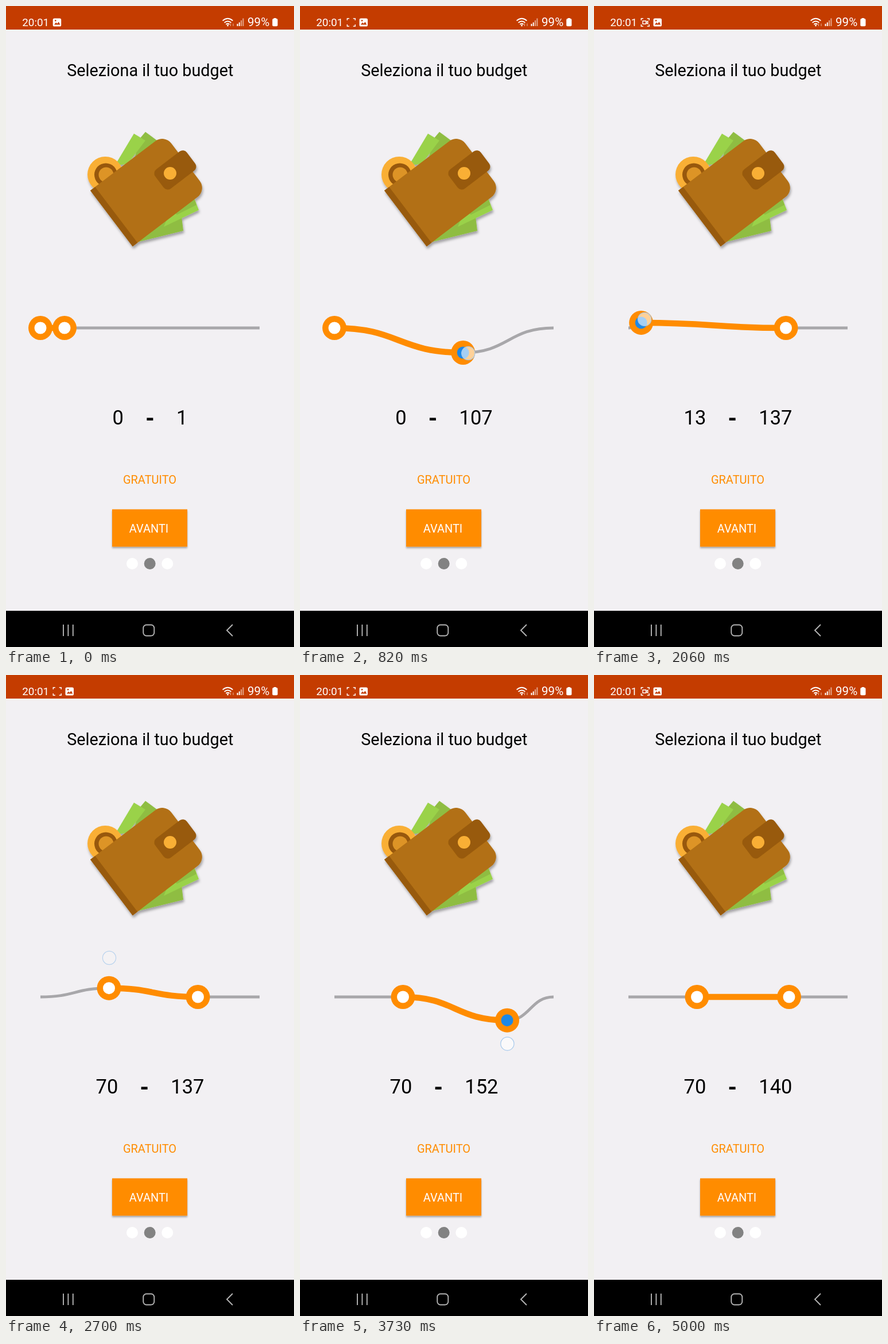
Animation, 502 px wide and 1115 px high, one loop 5510 ms. Source, as an HTML page:

```html
<!DOCTYPE html>
<html lang="it">
<head>
<meta charset="utf-8">
<title>Budget</title>
<style>
  html, body { margin: 0; width: 100%; height: 100%; overflow: hidden; background: #f2f0f3; }
  svg { display: block; width: 100%; height: 100%; font-family: Roboto, sans-serif; }
  .orange { fill: #ff8c00; }
  .line { fill: none; }
  .mid { text-anchor: middle; }
</style>
</head>
<body>
<svg viewBox="0 0 502 1115">
  <defs>
    <filter id="soft" x="-20%" y="-20%" width="140%" height="150%">
      <feDropShadow dx="1.5" dy="4" stdDeviation="2" flood-color="#000" flood-opacity=".33"/>
    </filter>
    <filter id="lift" x="-10%" y="-10%" width="120%" height="130%">
      <feDropShadow dx="0" dy="2.5" stdDeviation="1.6" flood-color="#000" flood-opacity=".32"/>
    </filter>
  </defs>
  <rect width="502" height="1115" fill="#f2f0f3"/>

  <!-- status bar -->
  <rect width="502" height="41" fill="#c43c00"/>
  <g fill="#fff">
    <text x="28.2" y="34.6" font-size="18.9">20:01</text>
    <text x="421" y="34.6" font-size="20.6">99%</text>
    <g id="picture">
      <rect y="21.5" width="14.5" height="14" rx="2.6"/>
      <path d="M2.3 32.6 5.4 28.4 7.5 30.8 10 27.4 12.8 32.6Z" fill="#c43c00"/>
      <circle cx="4.6" cy="25.4" r="1.3" fill="#c43c00"/>
    </g>
    <g id="recorder" fill="none" stroke="#fff" stroke-width="1.4">
      <path d="M82.3 25v-3.3h3.5M92.7 21.7h3.5V25M96.2 32v3.3h-3.5M85.8 35.3h-3.5V32"/>
      <path id="camera" d="M85 26h5.6v5.2H85zM90.8 28.2l3-1.8v4.6l-3-1.8"/>
    </g>
    <g fill="none" stroke="#fff" stroke-width="1.8">
      <path d="M377.6 25.6q8.9-7.8 17.8 0M380.6 29q5.9-5 11.8 0M383.4 32q3.1-2.5 6.2 0"/>
      <path d="M391.5 30.5v4.5M396 35v-4.5" stroke-width="1" opacity=".65"/>
    </g>
    <circle cx="386.5" cy="34" r="1.4"/>
    <path d="M402.5 31h2v4h-2zM405.8 28.5h2V35h-2z"/>
    <path d="M409.1 25h2v10h-2zM412.4 21.5h2V35h-2z" opacity=".55"/>
    <path d="M466.8 21h4v1.4h-4z"/>
    <rect x="464.3" y="22" width="9.2" height="13.2" rx="2"/>
  </g>

  <text class="mid" x="251.3" y="122.4" font-size="28.8">Seleziona il tuo budget</text>

  <!-- wallet -->
  <g filter="url(#soft)">
    <path d="M243 219 266 236 225 262 232 232Z" fill="#8fbd42"/>
    <path d="M223 222 243 234 212 275 190 277Z" fill="#9ad24a"/>
    <path d="M224 412 309 391 306 366 262 375Z" fill="#8fbd42"/>
    <path d="M275 384 336 355 328 334 285 360Z" fill="#9ad24a"/>
    <path d="M328 335 332 346 298 363 292 358Z" fill="#8fbd42"/>
    <circle cx="173" cy="293" r="31" fill="#f9af36"/>
    <circle cx="174" cy="293.5" r="20" fill="#98590c"/>
    <circle cx="174.5" cy="293.5" r="13" fill="#dd9427"/>
    <g transform="translate(147 321) rotate(-37.2)">
      <path d="M0 0H142a20 20 0 0 1 20 20V102a20 20 0 0 1-20 20H0Z" fill="#b27013"/>
      <path d="M0 0H10.5V122H0Z" fill="#985a0d"/>
      <rect x="105" y="40" width="69" height="42" rx="9" fill="#985a0d"/>
    </g>
    <circle cx="286" cy="291" r="11" fill="#f9af36"/>
  </g>

  <!-- range slider -->
  <path id="rail" class="line" stroke="#a8a7aa" stroke-width="5"/>
  <path id="span" class="line" stroke="#ff8c00" stroke-width="10.5"/>
  <g id="low"><circle class="orange" r="21"/><circle class="core" r="10.5"/></g>
  <g id="high"><circle class="orange" r="21"/><circle class="core" r="10.5"/></g>

  <g font-size="34.5">
    <text id="lowText" y="728" text-anchor="end"></text>
    <text id="dash" class="mid" y="731" font-size="40" font-weight="700">-</text>
    <text id="highText" y="728"></text>
  </g>

  <text class="mid orange" x="250.5" y="831" font-size="20">GRATUITO</text>
  <rect class="orange" x="185" y="875.5" width="131" height="65" filter="url(#lift)"/>
  <text class="mid" x="249" y="916" font-size="20" fill="#fff">AVANTI</text>
  <g fill="#fff">
    <circle cx="220" cy="970" r="10"/>
    <circle cx="250.7" cy="970" r="10" fill="#828282"/>
    <circle cx="281.3" cy="970" r="10"/>
  </g>

  <!-- navigation bar -->
  <rect y="1052" width="502" height="63"/>
  <g class="line" stroke="#b4b4b4" stroke-width="1.9">
    <path d="M100 1076v20M108.4 1076v20M116.8 1076v20M395 1076l-10 10 10 10"/>
    <rect x="239.3" y="1076.5" width="19" height="19" rx="5.5"/>
  </g>

  <circle id="touch" r="11.6" fill="#fff" stroke="#a6c9ec" stroke-width="1.2"/>
</svg>
<script>
const LOOP = 5510, LEFT = 60, RIGHT = 442, MID = 560;
const GAP = 42, UNIT = 1.7, DIGIT = 19.4, SETTLE = 400, FADE = 200;
const $ = id => document.getElementById(id);

// each row: time, thumb x, thumb offset y, finger x, finger y
const drags = [
  { side: 'high', keys: [
    [90, 102, 0, 103, 562], [330, 150, 14, 160, 577], [820, 284, 43, 293, 604],
    [1020, 332, 43, 334, 612], [1150, 334.5, 43, 335, 614]] },
  { side: 'low', keys: [
    [1820, 60, 0, 62, 558], [1960, 68, -4, 73, 553], [2060, 82, -9, 88, 545],
    [2300, 140, -34, 148, 516], [2500, 178, -43, 180, 495], [2600, 179.5, -43, 180, 492]] },
  { side: 'high', keys: [
    [3030, 334.5, 0, 335, 562], [3180, 342, 6, 346, 570], [3330, 354, 16, 356, 581],
    [3600, 364, 40, 365, 622], [3900, 354, 41, 353, 662], [4150, 344.8, 41, 343, 677],
    [4300, 340, 41, 340, 679]] }
];

const slope = (a, b, c) => (b[c] - a[c]) / (b[0] - a[0]);

// tangent that never overshoots its neighbours
function tangent(keys, i, c) {
  if (i === 0 || i === keys.length - 1) return 0;
  const a = slope(keys[i - 1], keys[i], c), b = slope(keys[i], keys[i + 1], c);
  return a * b > 0 ? 2 * a * b / (a + b) : 0;
}

function sample(keys, t, c) {
  const last = keys.length - 1;
  if (t <= keys[0][0]) return keys[0][c];
  if (t >= keys[last][0]) return keys[last][c];
  const i = keys.findIndex(k => k[0] > t) - 1;
  const a = keys[i], b = keys[i + 1], h = b[0] - a[0], p = (t - a[0]) / h, q = 1 - p;
  return a[c] * (1 + 2 * p) * q * q + b[c] * p * p * (3 - 2 * p)
    + h * p * q * (tangent(keys, i, c) * q - tangent(keys, i + 1, c) * p);
}

function bounce(p) {
  if (p >= 1) return 1;
  const x = p * 1.1226, hop = (s, base) => 8 * (x - s) ** 2 + base;
  if (x < 0.3535) return hop(0, 0);
  if (x < 0.7408) return hop(0.54719, 0.7);
  if (x < 0.9644) return hop(0.8526, 0.9);
  return hop(1.0435, 0.95);
}

function wave(x1, y1, x2, y2) {
  const m = (x1 + x2) / 2;
  return `M${x1} ${y1}C${m} ${y1} ${m} ${y2} ${x2} ${y2}`;
}

function place(id, thumb) {
  $(id).setAttribute('transform', `translate(${thumb.x} ${thumb.y})`);
  $(id).querySelector('.core').setAttribute('fill', thumb.held ? '#1e88e5' : '#fff');
}

function write(id, x, value) {
  $(id).setAttribute('x', x);
  if (value !== undefined) $(id).textContent = value;
}

function drawSlider(t) {
  const thumbs = { low: { x: LEFT, y: MID }, high: { x: LEFT + GAP, y: MID } };
  const touch = $('touch');
  touch.setAttribute('opacity', 0);

  for (const { side, keys } of drags) {
    const start = keys[0][0], end = keys[keys.length - 1][0];
    if (t < start) continue;
    const rest = Math.max(0, t - end), held = t < end;
    const dy = sample(keys, t, 2) * (1 - bounce(rest / SETTLE));
    thumbs[side] = { x: sample(keys, t, 1), y: MID + dy, held };
    if (rest < FADE) {
      const p = rest / FADE;
      touch.setAttribute('cx', sample(keys, t, 3));
      touch.setAttribute('cy', sample(keys, t, 4));
      touch.setAttribute('opacity', 1 - p * p);
      touch.setAttribute('fill-opacity', 0.6 * (1 - p) ** 2);
    }
  }

  const { low, high } = thumbs;
  $('rail').setAttribute('d', wave(LEFT, MID, low.x, low.y) + wave(high.x, high.y, RIGHT, MID));
  $('span').setAttribute('d', wave(low.x, low.y, high.x, high.y));
  place('low', low);
  place('high', high);

  const from = String(Math.round((low.x - LEFT) / UNIT));
  const to = String(Math.max(1, Math.round((high.x - LEFT - GAP) / UNIT)));
  const center = 251 - (to.length - from.length) * DIGIT / 2;
  write('lowText', center - 46, from);
  write('dash', center);
  write('highText', center + 46, to);
}

function drawStatus(t) {
  const recording = t >= 300;
  $('picture').setAttribute('transform', `translate(${recording ? 103.5 : 81.7} 0)`);
  $('recorder').setAttribute('opacity', recording ? 1 : 0);
  $('camera').setAttribute('opacity', t % 1000 < 500 ? 1 : 0);
}

const origin = performance.now();
function frame() {
  const t = (performance.now() - origin) % LOOP;
  drawSlider(t);
  drawStatus(t);
  requestAnimationFrame(frame);
}
frame();
</script>
</body>
</html>
```
